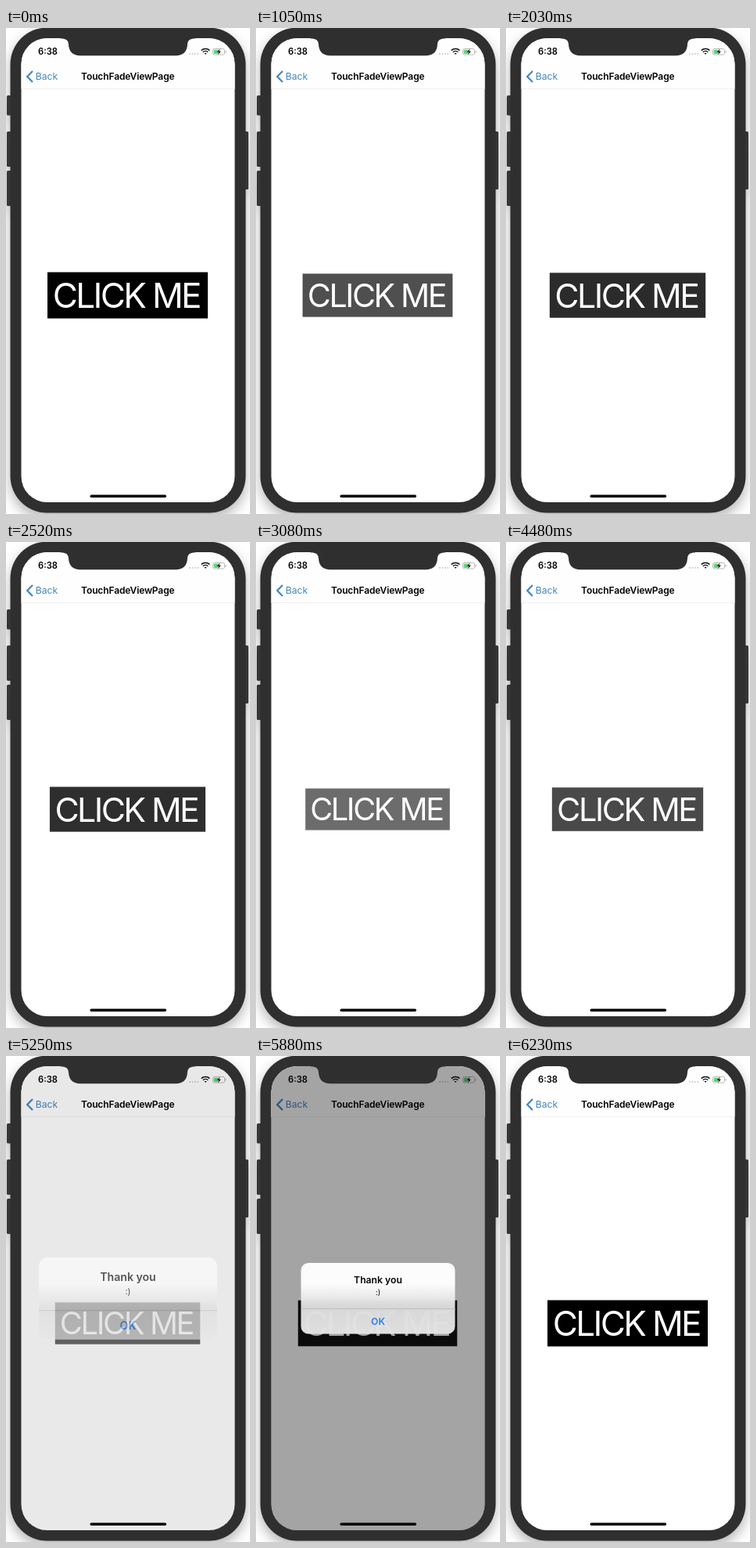
Write an HTML page that moves like this. It is 312 px wide and 620 px high and loops after 6.65 s.

```html
<!DOCTYPE html>
<html lang="en">
<head>
<meta charset="utf-8">
<title>Touch fade button</title>
<style>
  html, body { margin: 0; width: 100%; height: 100%; overflow: hidden; background: #fff; }
  svg { display: block; width: 312px; height: 620px; }
  text { font-family: Inter, Roboto, sans-serif; text-anchor: middle; }
  .bold { font-weight: 600; }
  .shadow { filter: drop-shadow(0 7px 8px rgba(0, 0, 0, .3)); }
</style>
</head>
<body>
<svg viewBox="0 0 312 620">
  <defs>
    <clipPath id="screen"><rect x="19.5" y="13" width="273" height="592" rx="33"/></clipPath>
    <linearGradient id="glass" gradientUnits="userSpaceOnUse" x1="0" y1="264" x2="0" y2="354">
      <stop offset=".3" stop-color="#fff"/>
      <stop offset=".62" stop-color="#dedede"/>
      <stop offset="1" stop-color="#e6e6e6"/>
    </linearGradient>
  </defs>

  <g class="shadow">
    <g fill="#363636">
      <rect x="1" y="86" width="8" height="25.5" rx="1.5"/>
      <rect x="1" y="132" width="8" height="45" rx="1.5"/>
      <rect x="1" y="182" width="8" height="45" rx="1.5"/>
      <rect x="302" y="132" width="8" height="74" rx="1.5"/>
    </g>
    <rect x="5.5" y="-.5" width="301" height="619" rx="47" fill="#2f2f2f"/>
  </g>

  <g clip-path="url(#screen)">
    <rect x="19" y="12" width="275" height="595" fill="#fff"/>
    <rect x="19" y="12" width="275" height="65" fill="#fefefe"/>
    <path d="M19 77.5H294" stroke="#f0f0f0"/>

    <text class="bold" x="53.5" y="34.3" font-size="11.2">6:38</text>
    <g fill="#c4c4c4">
      <circle cx="235" cy="33" r=".9"/><circle cx="238.4" cy="33" r=".9"/>
      <circle cx="241.8" cy="33" r=".9"/><circle cx="245.2" cy="33" r=".9"/>
    </g>
    <g fill="none" stroke="#111" stroke-width="1.6">
      <path d="M249.800 28.6a7.6 7.6 0 0 1 10.6 0M251.9 30.8a4.6 4.6 0 0 1 6.4 0"/>
      <path d="M253.5 32.1h3.2l-1.6 1.8z" fill="#111" stroke="none"/>
    </g>
    <rect x="264.5" y="26.5" width="15" height="7.6" rx="2" fill="#fff" stroke="#aaa" stroke-width=".8"/>
    <path d="M281 29v2.6" stroke="#aaa"/>
    <rect x="265.7" y="27.7" width="5.6" height="5.2" rx="1" fill="#62d27b"/>
    <path d="M273.6 26.4l-4 4.4h2.4l-1 3.5 4-4.5h-2.5z" fill="#111"/>

    <path d="M34 55L27.2 62L34 69" fill="none" stroke="#4486c0" stroke-width="2.2"/>
    <text x="52" y="66.3" font-size="12.2" fill="#4486c0">Back</text>
    <text class="bold" x="155.8" y="66.3" font-size="12" letter-spacing="-.13">TouchFadeViewPage</text>

    <g id="button">
      <rect x="53" y="311.5" width="205" height="59"/>
      <text x="153.800" y="357" font-size="44" letter-spacing="-2.6" fill="#fff">CLICK ME</text>
    </g>

    <rect id="dim" x="19" y="12" width="275" height="595" opacity="0"/>
    <g id="alert" opacity="0">
      <rect x="57.5" y="264" width="197" height="90.5" rx="9.5" fill="url(#glass)"/>
      <path d="M57.5 322.5H254.5" stroke="#c4c4c4"/>
      <text class="bold" x="156" y="290.4" font-size="12.2">Thank you</text>
      <text x="156" y="304.5" font-size="9.5">:)</text>
      <text class="bold" x="156" y="343.3" font-size="12.2" fill="#2f80ea">OK</text>
    </g>
    <rect x="107.5" y="595.6" width="97.5" height="3.3" rx="1.6"/>
  </g>

  <path d="M70 12H242V13.5C235 13.5 232.5 15.5 232 21C231.5 30.5 226 35.2 217 35.2H95C86 35.2 80.5 30.5 80 21C79.5 15.5 77 13.5 70 13.5Z" fill="#2f2f2f"/>
</svg>
<script>
  const LOOP = 6650, STEP = 70;
  // [start, goal]: goal 1 is pressed or shown, 0 is at rest
  const touches = [[515, 1], [1440, 0], [2225, 1], [3165, 0], [3994, 1], [5130, 0]];
  const popups = [[5130, 1], [5800, 0]];

  const [button, dim, alertBox] = ['button', 'dim', 'alert'].map(id => document.getElementById(id));

  const ease = x => {
    x = Math.min(1, Math.max(0, x));
    return x * x * (3 - 2 * x);
  };

  // Each move starts from wherever the one before it was interrupted.
  function track(moves, span, t) {
    let value = 0;
    moves.forEach(([start, goal], i) => {
      if (t < start) return;
      const end = Math.min(t, i + 1 < moves.length ? moves[i + 1][0] : LOOP);
      value += (goal - value) * ease((end - start) / span);
    });
    return value;
  }

  function scale(el, k, x, y) {
    el.setAttribute('transform', `translate(${x} ${y}) scale(${k}) translate(${-x} ${-y})`);
  }

  function draw(now) {
    const t = Math.floor((now % LOOP) / STEP) * STEP;
    const press = track(touches, 900, t);
    const shown = track(popups, 400, t);

    scale(button, 1 - .1 * press, 155.5, 341);
    button.setAttribute('opacity', 1 - .43 * press ** .7);
    dim.setAttribute('opacity', .4 * shown);
    alertBox.setAttribute('opacity', shown ** .3);
    scale(alertBox, t < popups[1][0] ? 1.2 - .2 * shown : 1, 156, 309);
  }

  const begin = performance.now();
  function tick() {
    draw(performance.now() - begin);
    requestAnimationFrame(tick);
  }
  tick();
</script>
</body>
</html>
```
